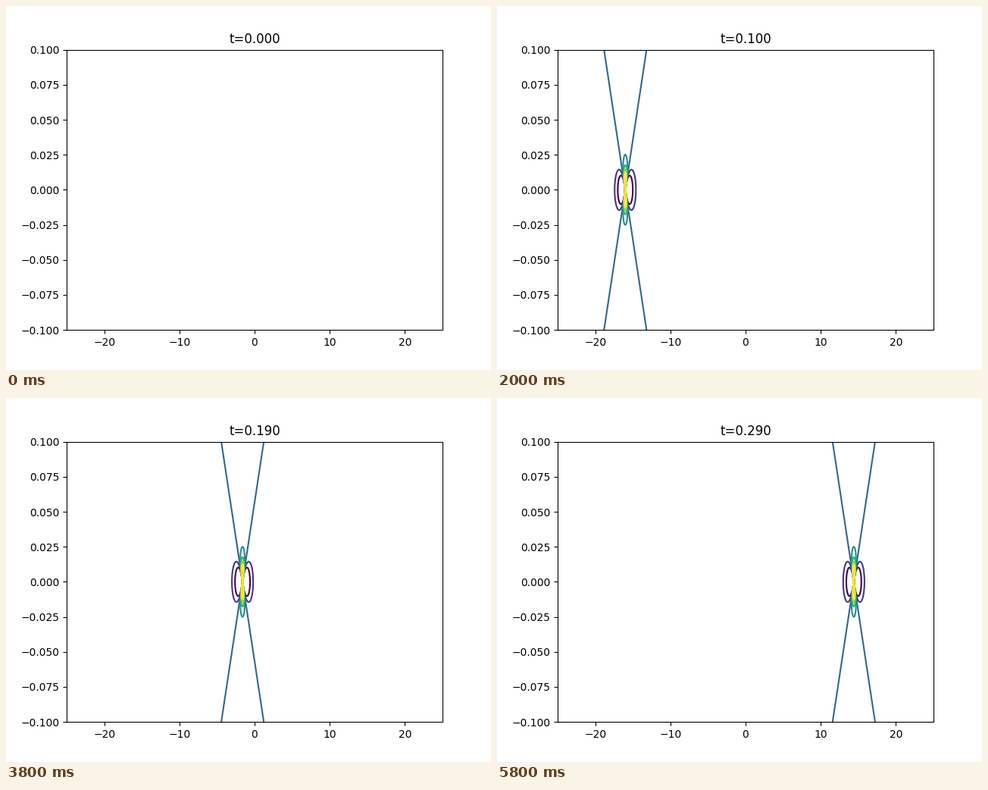
Animation, 640 px wide and 480 px high, one loop 6 s. Source, as a matplotlib script:

```python
import numpy as np
import matplotlib.pyplot as plt
from matplotlib.animation import FuncAnimation

FRAMES, INTERVAL, DT = 30, 200, 0.01
START, SPEED = -32, 160
STRETCH = 40          # horizontal stretch of the field
UNIT = 1600           # spacing between contour levels
LEVELS = UNIT * np.arange(-2, 5)
REACH = 3.2           # the contours stay within this distance

xs = np.linspace(-25, 25, 1001)
ys = np.linspace(-0.1, 0.1, 1001)

fig, ax = plt.subplots(figsize=(6.4, 4.8), dpi=100)


def field(x, y):
    """Quadrupole-like field that falls off as 1 / r^2."""
    u2, y2 = (x / STRETCH) ** 2, y ** 2
    with np.errstate(divide="ignore", invalid="ignore"):
        return np.ma.masked_invalid((y2 - 2 * u2) / (y2 + u2) ** 2)


def draw(i):
    t = i * DT
    center = START + SPEED * t
    ax.clear()
    near = xs[np.abs(xs - center) < REACH]
    if near.size > 1:
        z = field(near[None, :] - center, ys[:, None])
        if z.max() > LEVELS[0] and z.min() < LEVELS[-1]:
            ax.contour(near, ys, z, levels=LEVELS, cmap="viridis")
    ax.set(xlim=(-25, 25), ylim=(-0.1, 0.1), title=f"t={t:.3f}")


anim = FuncAnimation(fig, draw, frames=FRAMES, init_func=lambda: None,
                     interval=INTERVAL, repeat=True, repeat_delay=0)
plt.show()
```
